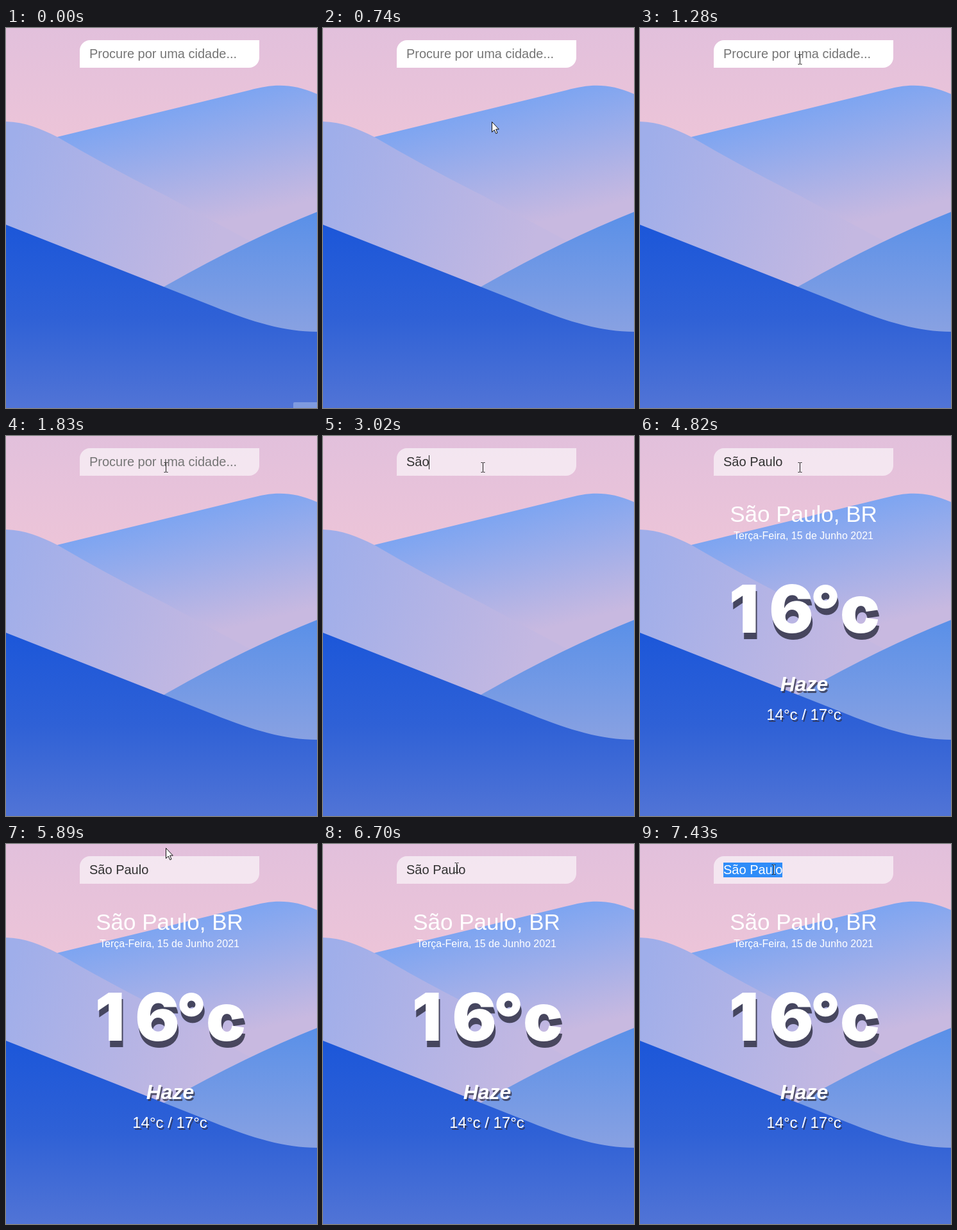
These frames come from a looping animation (485 by 593 pixels, 8000 ms). An HTML page:

```html
<!DOCTYPE html>
<html lang="pt-BR">
<head>
<meta charset="utf-8">
<style>
  html, body { margin: 0; width: 100%; height: 100%; overflow: hidden; }
  svg { display: block; font-family: "Liberation Sans", Arial, sans-serif; }
  .field { font-size: 20px; white-space: pre; }
  #weather { fill: #fff; text-anchor: middle; }
  .temp { font: 900 103px Inter, sans-serif; text-shadow: 2px 10px rgba(50, 50, 70, .85); }
  .sky { font: italic bold 32px "Liberation Sans", Arial, sans-serif; text-shadow: 2px 3px rgba(50, 50, 70, .75); }
  .range { font-size: 24px; text-shadow: 2px 3px rgba(50, 50, 70, .75); }
</style>
</head>
<body>
<svg width="485" height="593" viewBox="0 0 485 593">
  <defs>
    <linearGradient id="air" gradientUnits="userSpaceOnUse" x1="0" y1="0" x2="0" y2="170">
      <stop stop-color="#e2c0dc"/><stop offset="1" stop-color="#ecc4d8"/>
    </linearGradient>
    <linearGradient id="far" gradientUnits="userSpaceOnUse" x1="230" y1="135" x2="275" y2="319">
      <stop stop-color="#7ea5f1"/><stop offset="1" stop-color="#c8b9e0"/>
    </linearGradient>
    <linearGradient id="left" gradientUnits="userSpaceOnUse" x1="0" y1="200" x2="330" y2="330">
      <stop stop-color="#9faeea"/><stop offset="1" stop-color="#c4b8e1"/>
    </linearGradient>
    <linearGradient id="right" gradientUnits="userSpaceOnUse" x1="0" y1="290" x2="0" y2="472">
      <stop stop-color="#5a90e8"/><stop offset="1" stop-color="#88a1e2"/>
    </linearGradient>
    <linearGradient id="front" gradientUnits="userSpaceOnUse" x1="0" y1="310" x2="0" y2="593">
      <stop stop-color="#1c57d9"/><stop offset=".5" stop-color="#2f61d6"/><stop offset="1" stop-color="#5174d6"/>
    </linearGradient>
    <clipPath id="clip"><rect id="clipBox" y="29" width="93" height="23"/></clipPath>
  </defs>

  <rect width="485" height="593" fill="url(#air)"/>
  <path fill="url(#far)" d="M80 170L380 97C417 87 446 86 485 103V420H80Z"/>
  <path fill="url(#left)" d="M0 146C30 147 54 157 80 170Q160 217 250 262L430 359V430H0Z"/>
  <path fill="url(#right)" d="M246 404Q370 333 485 287V500H246Z"/>
  <path fill="url(#front)" d="M0 307L325 435C385 459 435 474 485 474V593H0Z"/>
  <rect id="corner" x="448" y="584" width="40" height="12" rx="2" fill="#7f9be0"/>

  <path id="box" fill="#fff" d="M131 19H395V46A16 16 0 0 1 379 62H115V35A16 16 0 0 1 131 19Z"/>
  <text id="entry" class="field" x="130" y="47"></text>
  <rect id="caret" y="30" width="1" height="22" fill="#222"/>
  <g id="selection" clip-path="url(#clip)">
    <rect x="130" y="29" width="92" height="23" fill="#2f8cf8"/>
    <text class="field" x="130" y="47" fill="#fff">São Paulo</text>
  </g>

  <g id="weather">
    <text x="255" y="134" font-size="35">São Paulo, BR</text>
    <text x="255" y="161" font-size="16">Terça-Feira, 15 de Junho 2021</text>
    <text class="temp" x="162 236 289 343" y="307">16°c</text>
    <text class="sky" x="256" y="398">Haze</text>
    <text class="range" x="255.5" y="443">14°c / 17°c</text>
  </g>

  <path id="arrow" fill="#fff" stroke="#111" d="M.5 .5V16.5L4.2 13L6.7 18.7L9 17.7L6.6 12H11.3Z"/>
  <path id="beam" fill="none" stroke="#222" d="M-3 -7.5H-1L0 -7L1 -7.5H3M0 -7V7M-3 7.5H-1L0 7L1 7.5H3"/>
</svg>
<script>
const LOOP = 8000, FOCUS = 1300, BLINK = 530;
const PICK_WORD = 6770, PICK_ALL = 7170;
const CITY = "São Paulo", HINT = "Procure por uma cidade...";
const keyTimes = [2290, 2950, 3020, 3150, 3350, 3610, 3670, 3870, 4000];

// time, x, y of the pointer
const pointerPath = [
  [330, 428, 585], [540, 328, 320], [740, 263, 146], [1080, 249, 56], [1150, 249, 49],
  [5620, 249, 49], [5890, 249, 6], [6090, 249, 6], [6830, 199, 43],
  [6970, 215, 35], [7170, 215, 35], [7430, 208, 40], [LOOP, 208, 40]
];

const el = id => document.getElementById(id);
const [corner, box, entry, caret, selection, clipBox, weather, arrow, beam] =
  ["corner", "box", "entry", "caret", "selection", "clipBox", "weather", "arrow", "beam"].map(el);
const show = (node, on) => node.style.display = on ? "" : "none";
const clamp = v => Math.min(1, Math.max(0, v));

function pointerAt(t) {
  const i = Math.max(1, pointerPath.findIndex(p => p[0] > t));
  const [t0, x0, y0] = pointerPath[i - 1], [t1, x1, y1] = pointerPath[i];
  const k = clamp((t - t0) / (t1 - t0));
  return [Math.round(x0 + (x1 - x0) * k), Math.round(y0 + (y1 - y0) * k)];
}

function drawField(t) {
  const count = keyTimes.filter(k => k <= t).length;
  box.setAttribute("fill-opacity", 1 - .4 * clamp((t - 1280) / 200));
  entry.textContent = count ? CITY.slice(0, count) : HINT;
  entry.setAttribute("fill", count ? "#313131" : "#757575");

  const since = t - (count ? keyTimes[count - 1] : FOCUS);
  show(caret, since >= 0 && since % (2 * BLINK) < BLINK && t < PICK_WORD);
  caret.setAttribute("x", 130 + (count ? Math.floor(entry.getComputedTextLength()) : 0));

  show(selection, t >= PICK_WORD);
  clipBox.setAttribute("x", t < PICK_ALL ? 171 : 130);
}

function drawPointer(t) {
  const [x, y] = pointerAt(t);
  const overField = x >= 115 && x < 395 && y >= 19 && y < 62;
  show(arrow, t >= 330 && !overField);
  show(beam, overField);
  arrow.setAttribute("transform", `translate(${x} ${y})`);
  beam.setAttribute("transform", `translate(${x + .5} ${y})`);
}

function frame(now) {
  const t = now % LOOP;
  show(corner, t < 70);
  show(weather, t >= 4820);
  drawField(t);
  drawPointer(t);
  requestAnimationFrame(frame);
}
frame(0);
</script>
</body>
</html>
```
